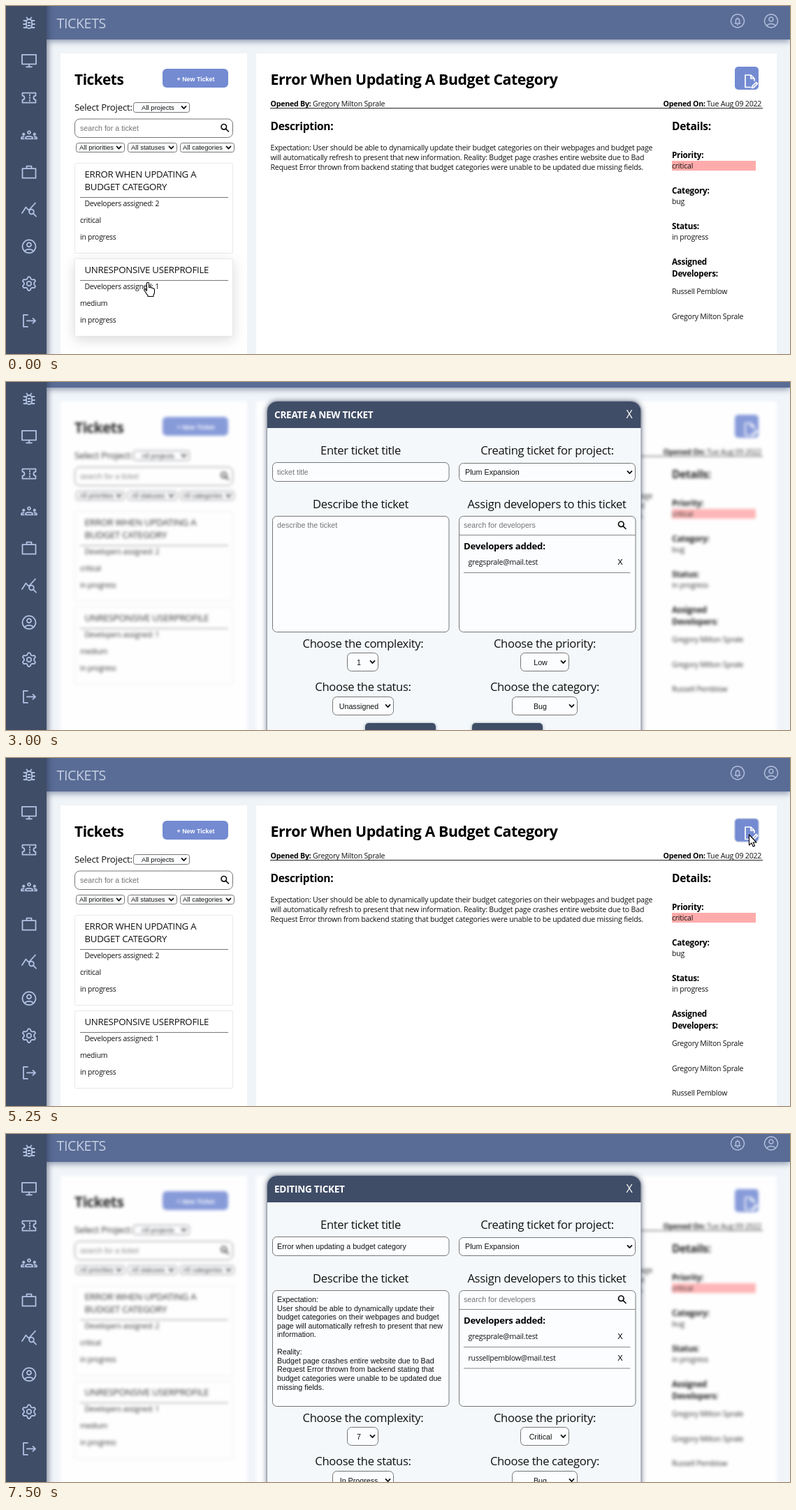
Write an HTML page that moves like this. It is 1122x499 px and loops after 7750 ms.

```html
<!DOCTYPE html>
<html lang="en">
<head>
<meta charset="utf-8">
<title>Tickets</title>
<style>
  html, body { margin: 0; width: 100%; height: 100%; overflow: hidden; background: #eff4f8; }
  svg { display: block; width: 1122px; height: 499px; }
  text { font-family: "Open Sans", "Noto Sans", sans-serif; letter-spacing: -.02em; white-space: pre; }
  .ui { font-family: "Liberation Sans", Arial, sans-serif; letter-spacing: 0; }
  .bold { font-weight: 700; }
  .mid { text-anchor: middle; }
  .line { fill: none; stroke-linecap: round; stroke-linejoin: round; }
  .bar { filter: drop-shadow(0 2px 5px rgba(50, 65, 105, .6)); }
  .side { filter: drop-shadow(2px 0 4px rgba(40, 50, 80, .6)); }
  .lift { filter: drop-shadow(0 5px 9px rgba(0, 0, 0, .14)); }
  .dialog { filter: drop-shadow(0 0 1px rgba(45, 57, 84, .6)) drop-shadow(0 0 4px rgba(45, 57, 84, .75)); }
  .btn { filter: drop-shadow(0 1px 2px rgba(50, 65, 105, .6)); }
</style>
</head>
<body>
<svg viewBox="0 0 1122 499">
  <rect width="1122" height="499" fill="#eff4f8"/>
  <g id="page">
    <g id="content"></g>
    <rect id="veil" x="58" y="48" width="1064" height="560" fill="#f5f9fa"/>
    <g id="top"></g>
    <g id="modal"></g>
  </g>
  <g id="side"></g>
  <g id="cursor"></g>
</svg>
<script>
const LOOP = 7750;
const OWNER = "Gregory Milton Sprale", HELPER = "Russell Pemblow";
const EMAILS = ["gregsprale@mail.test", "russellpemblow@mail.test"];
const PROJECT = "Plum Expansion";
const NAVY = "#404d67", BLUE = "#748bd2", GREY = "#767676";
const $ = id => document.getElementById(id);

// Drawing helpers
const text = (x, y, size, str, cls = "", fill = "#111") =>
  `<text x="${x}" y="${y}" font-size="${size}" class="${cls}" fill="${fill}">${str}</text>`;
const box = (x, y, x2, y2, r, fill, stroke = "none", extra = "") =>
  `<rect x="${x}" y="${y}" width="${x2 - x}" height="${y2 - y}" rx="${r}" fill="${fill}" stroke="${stroke}" ${extra}/>`;
const rule = (x, y, x2, color) => `<path d="M${x} ${y}H${x2}" stroke="${color}"/>`;
const path = (x, y, d, color, width, fill = "none") =>
  `<path class="line" transform="translate(${x} ${y})" d="${d}" style="fill:${fill}" stroke="${color}" stroke-width="${width}"/>`;
const icon = (x, y, d, color, width = 1.7) => path(x - 12, y - 12, d, color, width);
const chevron = (x, y) => path(x, y, "M-3-1.6L0 1.6L3-1.6", "#111", 1.8);
const lens = (x, y) => path(x, y, "M-1.2-5a3.8 3.8 0 1 0 .01 0M1.8 1.8L5.5 5.5", "#111", 1.7);
const select = (x, y, x2, y2, r, tx, ty, size, str, cls = "ui") =>
  box(x + .5, y + .5, x2 - .5, y2 - .5, r, "#fcfdfe", GREY) +
  text(tx, ty, size, str, cls) + chevron(x2 - 8.5, (y + y2) / 2);

const disc = "M12 2.6a9.4 9.4 0 1 0 .01 0";
const user = disc + "M12 6.5a3 3 0 1 0 .01 0M6 18.8c2-3.6 10-3.6 12 0";
const bell = disc + "M8.2 15.5h7.6M9.4 15.3v-4a2.6 2.6 0 0 1 5.2 0v4M12 7.4v1M11.4 17.6h1.2";
const gear = "M" + Array.from({ length: 24 }, (_, i) => {
  const r = i % 4 < 2 ? 9.8 : 7.2, a = (i - .5) * Math.PI / 12 - Math.PI / 2;
  return (12 + r * Math.cos(a)).toFixed(1) + " " + (12 + r * Math.sin(a)).toFixed(1);
}).join("L") + "ZM12 8.8a3.2 3.2 0 1 0 .01 0";
const sideIcons = [
  "M8 10a4 4 0 0 1 8 0v5a4 4 0 0 1-8 0zM4.5 8H8M16 8h3.5M4 13h4M16 13h4M4.5 18H8M16 18h3.5M8.5 3.5l2 2.5M15.5 3.5l-2 2.5M10.5 11h3M10.5 15h3",
  "M2 3.5h20v13.5H2zM8 21h8M12 17v4",
  "M2.5 5h19v4a3 3 0 0 0 0 6v4h-19v-4a3 3 0 0 0 0-6zM13 7.5v1.3M13 11.4v1.3M13 15.2v1.3",
  "M12 6.5a2 2 0 1 0 .01 0M7 17.5v-1.2c0-3.2 10-3.2 10 0v1.2zM4.2 9.8a1.2 1.2 0 1 0 .01 0M19.8 9.8a1.2 1.2 0 1 0 .01 0M4.5 17.5H1v-1.3q.5-1.7 3.5-1.6M19.5 17.5H23v-1.3q-.5-1.7-3.5-1.6",
  "M2.5 7h19v13.5h-19zM8.5 7V3.5h7V7",
  "M2 17.5L7.5 9l4 4.5L21 3M15.5 12.2a3.4 3.4 0 1 0 .01 0M18 18.2l4 4",
  user,
  gear,
  "M10 3.5H4v17h6M9 12h12M17.5 8.5L21 12l-3.5 3.5"
];

const tickets = {
  budget: {
    title: "Error When Updating A Budget Category", date: "Tue Aug 09 2022",
    priority: "critical", tint: "#ffabab",
    body: ["Expectation: User should be able to dynamically update their budget categories on their webpages and budget page",
      "will automatically refresh to present that new information. Reality: Budget page crashes entire website due to Bad",
      "Request Error thrown from backend stating that budget categories were unable to be updated due missing fields."]
  },
  profile: {
    title: "Unresponsive Userprofile", date: "Tue Aug 09 2022",
    priority: "medium", tint: "#ffdc9e",
    body: ["User profile page does not respond to changes in screen size."]
  }
};

function card(y, y2, title, devs, priority, hover) {
  const base = title.length > 1 ? y + 49.5 : y + 31.5;
  return box(98.5, y + .5, 324.5, y2 - .5, 1, "#fff", "#e6e8ea", hover ? 'class="lift"' : "") +
    title.map((s, i) => text(112.5, y + 21.3 + i * 17.4, 13.24, s)).join("") +
    rule(106, base, 318, "#777") +
    text(112.5, base + 12.2, 10.4, "Developers assigned: " + devs) +
    text(106, base + 36.3, 10.4, priority) + text(106, base + 60.5, 10.4, "in progress");
}

function listPanel(s) {
  return box(78, 68, 345, 557, 0, "#fff") + text(98, 112.5, 20.8, "Tickets", "bold", "#000") +
    box(224, 90, 318, 117, 6, BLUE, s.hover === "new" ? "#c2cbe6" : "none", 'stroke-width="1.6"') +
    text(271.5, 108, 8.9, "+ New Ticket", "ui bold mid", "#fff") +
    text(98, 149.5, 13.3, "Select Project:") +
    select(182, 138, 263, 153, 3, 194, 149, 9.6, "All projects") +
    box(98.5, 162, 324.5, 188.5, 7, "#fff", GREY) + lens(313, 174.5) +
    text(106, 179, 10.65, "search for a ticket", "ui", "#757575") +
    select(100, 196, 170, 210, 3, 105, 206.3, 9.5, "All priorities") +
    select(174, 196, 245, 210, 3, 179, 206.3, 9.5, "All statuses") +
    select(249, 196, 327, 210, 3, 253, 206.3, 9.5, "All categories") +
    card(225, 355, ["ERROR WHEN UPDATING A", "BUDGET CATEGORY"], 2, "critical", s.hover === "first") +
    card(362, 474, ["UNRESPONSIVE USERPROFILE"], 1, "medium", s.hover === "second");
}

function detailPanel(s) {
  const t = tickets[s.ticket];
  const field = (y, label) => text(953, y, 11.7, label, "bold", "#000");
  return box(358, 68, 1103, 557, 0, "#fff") + text(378.5, 112.5, 21.35, t.title, "bold", "#000") +
    box(1043, 87, 1077, 120, 5, BLUE, s.hover === "edit" ? "#b4bfdf" : "none", 'stroke-width="1.6"') +
    icon(1066, 108, "M11.5 20.5H4V3h8l5 5v3M12 3v5h5M13.5 21.5l.4-2.3 5.8-5.8 1.9 1.9-5.8 5.8z", "#fff") +
    text(378.5, 143.5, 10.6, "Opened By:", "bold", "#000") + text(439, 143.5, 10.6, OWNER) +
    text(940.5, 143.5, 10.6, "Opened On:", "bold", "#000") + text(1003, 143.5, 10.6, t.date) +
    rule(378, 146.5, 1083, "#222") +
    text(378.5, 177.5, 15.5, "Description:", "bold", "#000") + text(953, 177.5, 15.5, "Details:", "bold", "#000") +
    t.body.map((line, i) => text(378.5, 206.6 + i * 14.3, 10.58, line)).join("") +
    field(218, "Priority:") + box(953, 222, 1073, 236, 0, t.tint) + text(953, 233, 10.5, t.priority) +
    field(269.3, "Category:") + text(953, 284.3, 10.5, "bug") +
    field(320, "Status:") + text(953, 335, 10.5, "in progress") +
    field(371, "Assigned") + field(388, "Developers:") +
    s.devs.map((name, i) => text(953, 413.2 + i * 35.6, 10.5, name)).join("");
}

function dialog(kind) {
  const edit = kind === "edit", hint = "#757575", ink = edit ? "#111" : hint;
  const note = edit ? ["Expectation:", "User should be able to dynamically update their",
    "budget categories on their webpages and budget", "page will automatically refresh to present that new",
    "information.", "", "Reality:", "Budget page crashes entire website due to Bad",
    "Request Error thrown from backend stating that", "budget categories were unable to be updated due",
    "missing fields."] : ["describe the ticket"];
  const label = (x, y, s) => text(x, y, 16.6, s, "mid");
  const field = (x, y, y2) => box(x + .5, y + .5, x + 253, y2 - .5, 6, "#fcfdff", "#777");
  const pick = (x, y, x2, tx, s) => select(x, y, x2, y + 27, 6, tx, y + 17.5, 10.7, s, "ui mid");
  const button = (x, x2, s) => box(x, 529, x2, 562, 5, NAVY, "none", 'class="btn"') +
    text((x + x2) / 2, 551, 16.8, s, "ui mid", "#fff");
  return box(374, 68, 908.5, 601, 14, "#f4f8fa", "none", 'class="dialog"') +
    `<path d="M374 106V82a14 14 0 0 1 14-14H894.5a14 14 0 0 1 14 14V106z" fill="${NAVY}"/>` +
    text(384, 92.3, 13.6, edit ? "EDITING TICKET" : "CREATE A NEW TICKET", "bold", "#fff") +
    text(892, 92.3, 16, "X", "mid", "#fff") +
    label(507.5, 144.3, "Enter ticket title") + label(774.5, 144.3, "Creating ticket for project:") +
    field(381, 155, 183) + text(388, 172.8, 10.7, edit ? "Error when updating a budget category" : "ticket title", "ui", ink) +
    select(648, 156, 901, 183, 6, 657, 173.3, 10.75, PROJECT) +
    label(507.5, 220.8, "Describe the ticket") + label(774, 220.8, "Assign developers to this ticket") +
    field(381, 232, 399) + note.map((s, i) => text(388, 249 + i * 12.55, 10.7, s, "ui", ink)).join("") +
    field(648, 232, 399) + rule(648, 259.5, 901, "#888") + lens(881.5, 245) +
    text(655, 249, 10.7, "search for developers", "ui", hint) +
    text(655, 280.3, 13.16, "Developers added:", "bold", "#000") +
    EMAILS.slice(0, edit ? 2 : 1).map((mail, i) => text(661.5, 302 + i * 30.5, 10.6, mail) +
      text(879, 302.3 + i * 30.5, 11.2, "X", "ui mid", "#000") + rule(655, 313.5 + i * 30.5, 893.5, "#888")).join("") +
    label(511, 420.5, "Choose the complexity:") + label(771, 420.5, "Choose the priority:") +
    pick(488, 428, 533, 505, edit ? "7" : "1") + pick(736, 428, 806, 765, edit ? "Critical" : "Low") +
    label(511, 483.3, "Choose the status:") + label(771, 483.3, "Choose the category:") +
    pick(467, 491, 555, 505, edit ? "In Progress" : "Unassigned") + pick(724, 491, 818, 764.5, "Bug") +
    button(514, 615, "Cancel") + button(667, 768, "Submit");
}

const pointers = {
  arrow: "M0 0v15l3.4-3.2 2.3 5.2 2.4-1-2.3-5h4.7z",
  hand: "M-1.6 12V1.4a1.6 1.6 0 0 1 3.2 0V7q2.5-1 3 .6q2.3-.6 2.7 1q2-.3 2.2 1.4v4q0 2-1.5 4v2h-8v-1.5q-2-2-3.2-4.5l-2-3q-.4-2 1.4-1.6z"
};

// Each step changes only what it names; the rest carries over.
const steps = [
  [0, { ticket: "budget", devs: [HELPER, OWNER], hover: "second", cursor: ["hand", 203, 396.5], modal: "", show: 1, scroll: 0 }],
  [500, { ticket: "profile", devs: [OWNER] }],
  [750, { hover: "first", cursor: ["hand", 237, 332] }],
  [1000, { cursor: ["hand", 237, 322] }],
  [1250, { ticket: "budget", hover: "", cursor: ["arrow", 297, 189] }],
  [1500, { cursor: ["arrow", 289, 132] }],
  [1750, { devs: [OWNER, OWNER, HELPER], hover: "new", cursor: ["hand", 286.5, 113] }],
  [2000, { hover: "", modal: "create", show: .8, cursor: ["arrow", 288, 122] }],
  [2250, { show: 1, cursor: ["arrow", 1013, 98] }],
  [2500, { cursor: null }],
  [3000, { scroll: 40 }],
  [3250, { scroll: 102 }],
  [3500, { scroll: 67 }],
  [3750, { scroll: 0, cursor: ["arrow", 896, 72] }],
  [4000, { cursor: ["arrow", 915, 54] }],
  [4250, { cursor: ["hand", 896, 96] }],
  [4500, { cursor: ["hand", 896, 81] }],
  [4750, { modal: "", cursor: ["arrow", 1030, 115] }],
  [5000, { hover: "edit", cursor: ["hand", 1062, 113.5] }],
  [5250, { cursor: ["arrow", 1063.5, 110] }],
  [5500, { hover: "", modal: "edit", cursor: null }],
  [6000, { scroll: 102 }],
  [6500, { scroll: 67 }],
  [6750, { scroll: 0 }],
  [7500, { scroll: 8 }]
];
let carried = {};
const states = steps.map(([at, change]) => (carried = { ...carried, ...change, at }));

$("top").innerHTML = box(58, -12, 1122, 48, 0, "#596c95", "none", 'class="bar"') +
  text(72.5, 31.6, 19.6, "TICKETS", "", "#c6d0e6") +
  icon(1047, 21.5, bell, "#b1bedd", 1.5) + icon(1095, 21.5, user, "#b1bedd", 1.5);
$("side").innerHTML = box(-10, -10, 58, 510, 0, NAVY, "none", 'class="side"') +
  sideIcons.map((d, i) => icon(33, 25 + i * 53.3, d, "#b3c1e2", 1.8)).join("");

function draw(s) {
  $("page").setAttribute("transform", `translate(0 ${-s.scroll})`);
  $("content").innerHTML = listPanel(s) + detailPanel(s);
  $("content").style.filter = s.modal ? `blur(${2 * s.show}px)` : "none";
  $("veil").style.opacity = s.modal ? .15 * s.show : 0;
  $("modal").innerHTML = s.modal ? dialog(s.modal) : "";
  $("modal").style.opacity = s.show;
  $("cursor").innerHTML = s.cursor ? path(s.cursor[1], s.cursor[2], pointers[s.cursor[0]], "#000", 1.1, "#fff") : "";
}

let shown = null;
function tick(now) {
  const t = now % LOOP;
  const state = states.filter(s => s.at <= t).pop();
  if (state !== shown) draw(shown = state);
  requestAnimationFrame(tick);
}
tick(0);
</script>
</body>
</html>
```
